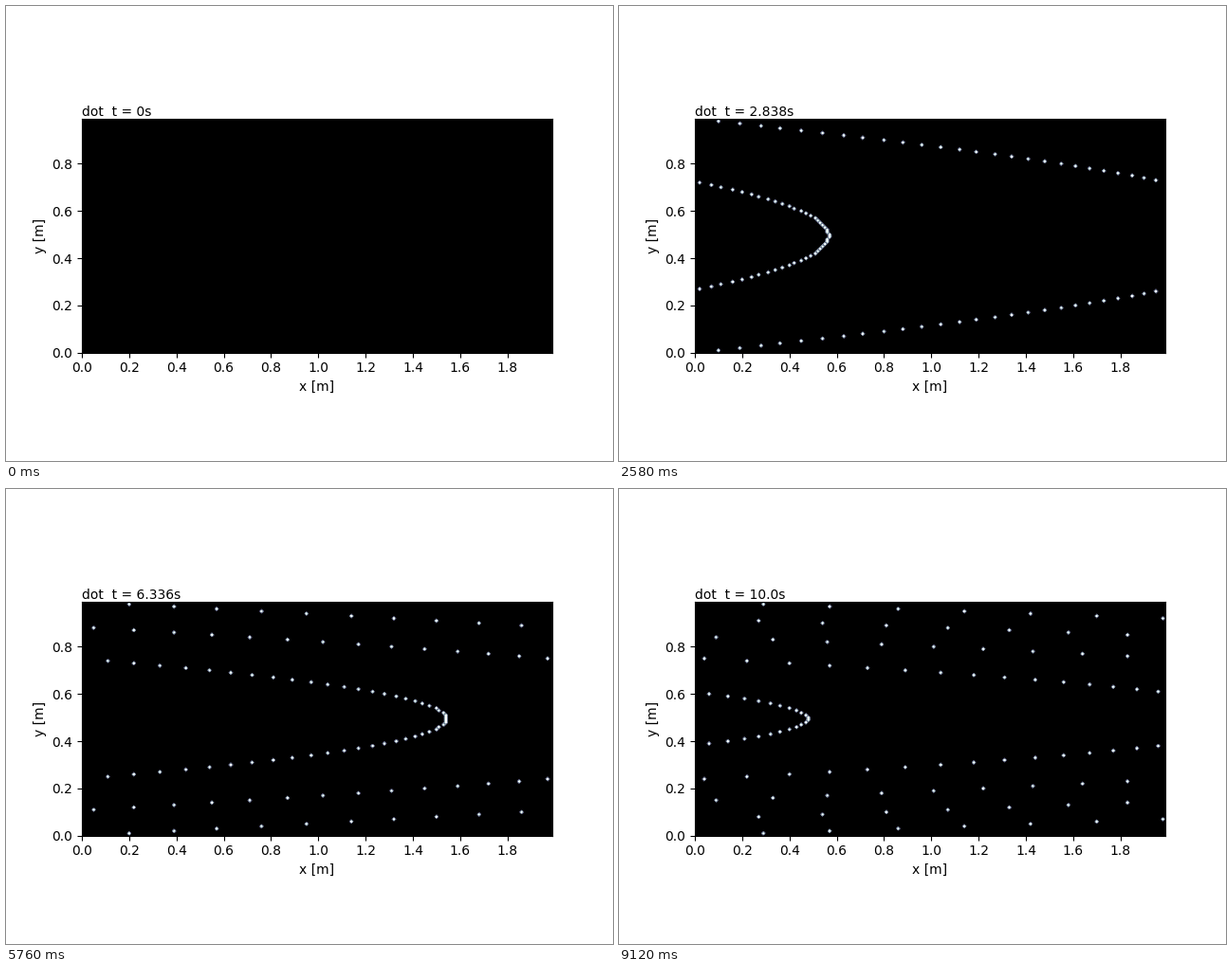
Recreate the animation shown at these times as a matplotlib script. Size 640 px wide and 480 px high, loop 9150 ms.

```python
import numpy as np
import matplotlib.pyplot as plt
from matplotlib.animation import FuncAnimation

DX = 0.01
NX, NY = 200, 100
DT, T_END = 0.033, 10.0
FRAMES, INTERVAL = 305, 30
NU = 0.00208        # viscosity
G = 3.8             # undisturbed profile u = G * y * (H - y)
H = (NY - 1) * DX
AGE = 0.83          # time the flow has decayed before t = 0

x = np.arange(NX) * DX
y = np.arange(NY) * DX
rows = np.arange(1, NY - 1)
levels = np.arange(8) * 0.15

# Sine modes of a parabolic channel flow decaying by viscosity
modes = np.arange(1, 200, 2)
rates = NU * (modes * np.pi / H) ** 2
amps = 8 * G * H**2 / (np.pi * modes) ** 3 * np.exp(-rates * AGE)
shapes = np.sin(np.outer(y[rows], modes) * np.pi / H)


def travel(t):
    """Distance each tracer has moved by time t."""
    return shapes @ (amps * (1 - np.exp(-rates * t)) / rates)


def dot_field(t):
    """Grid with one lit node per row; the inner columns are periodic."""
    field = np.zeros((NY, NX))
    if t > 0:
        steps = np.floor(travel(t) / DX).astype(int)
        field[rows, 1 + steps % (NX - 2)] = 1
    return field


fig, ax = plt.subplots(figsize=(6.4, 4.8), dpi=100)
ax.set_aspect("equal")
ax.set_xlabel("x [m]")
ax.set_ylabel("y [m]")
ax.set_xlim(0, x[-1])
ax.set_ylim(0, y[-1])
ax.set_xticks(np.arange(10) * 0.2)
ax.set_yticks(np.arange(5) * 0.2)
label = ax.text(0, 1.002, "")
shown = []


def update(i):
    t = min(round(i * DT, 3), T_END) if i else 0
    while shown:
        shown.pop().remove()
    shown.append(ax.contourf(x, y, dot_field(t), levels=levels, cmap="bone",
                             vmin=0.075, vmax=0.975))
    label.set_text(f"dot  t = {t}s")
    return [label]


anim = FuncAnimation(fig, update, frames=FRAMES, interval=INTERVAL,
                     init_func=lambda: update(0), repeat=True,
                     repeat_delay=0, blit=False)
plt.show()
```
